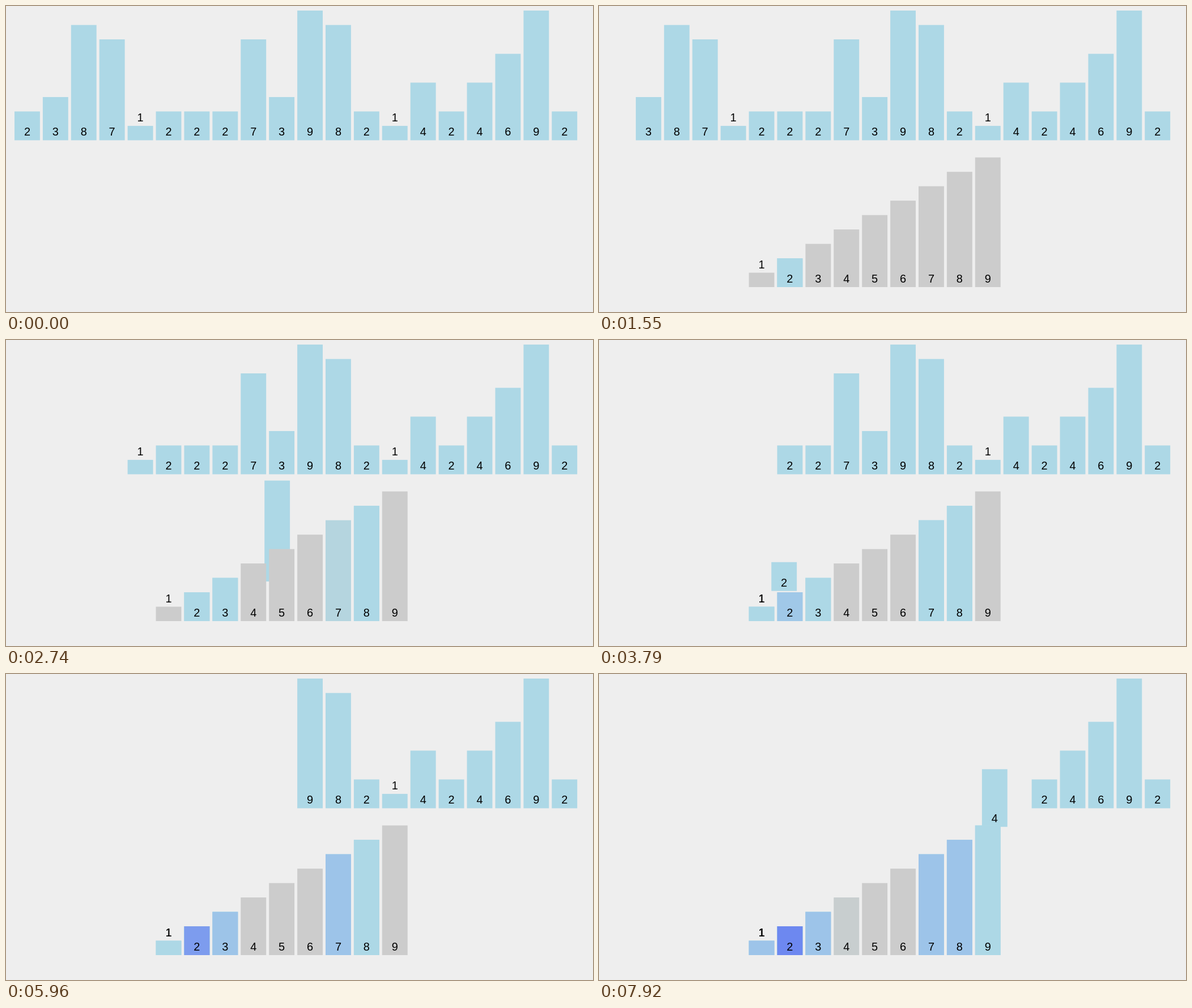
Recreate the animation shown at these times as an HTML page. Size 1036x541 px, loop 7990 ms.

```html
<!DOCTYPE html>
<html lang="en">
<head>
<meta charset="utf-8">
<title>Counting sort</title>
<style>
  html, body { margin: 0; width: 100%; height: 100%; overflow: hidden; background: #eee; }
  svg { display: block; width: 1036px; height: 541px; }
  text { font: 19.96px "Liberation Sans", Arial, sans-serif; text-anchor: middle; fill: #000; }
</style>
</head>
<body>
<svg id="stage" viewBox="0 0 1036 541"></svg>
<script>
const LOOP = 7990, TICK = 70, FIRST_TICK = 500;
const MOVE = 265, GROW_START = 497;
const LEFT = 15, PITCH = 49.91, WIDTH = 44.9, UNIT = 25.48;
const TOP_BASE = 237.4, BUCKET_BASE = 497, TEXT_GAP = 15;
const VALUES = [2, 3, 8, 7, 1, 2, 2, 2, 7, 3, 9, 8, 2, 1, 4, 2, 4, 6, 9, 2];
const GRAY = [204, 204, 204], BLUE = [173, 216, 230];

const stage = document.getElementById("stage");

function add(parent, tag, attrs) {
  const node = document.createElementNS("http://www.w3.org/2000/svg", tag);
  for (const name in attrs) node.setAttribute(name, attrs[name]);
  return parent.appendChild(node);
}

const columnX = column => LEFT + PITCH * column;
const mix = (a, b, p) => a + (b - a) * p;
const mixColor = (a, b, p) => a.map((v, i) => mix(v, b[i], p));
const rgb = color => `rgb(${color.map(Math.round)})`;

function ease(t) {
  t = Math.min(1, Math.max(0, t));
  return t < 0.5 ? 4 * t ** 3 : 1 - 4 * (1 - t) ** 3;
}

// Bars start at their top left corner; short ones carry the label above.
function makeBar(value, column, base) {
  const height = value * UNIT;
  const group = add(stage, "g", {});
  const rect = add(group, "rect", { width: WIDTH, height, fill: rgb(BLUE) });
  const labelY = value === 1 ? -TEXT_GAP : height - TEXT_GAP;
  add(group, "text", { x: WIDTH / 2, y: labelY + 7 }).textContent = value;
  const bar = { value, height, group, rect, x: columnX(column), y: base - height };
  place(bar, bar.x, bar.y);
  return bar;
}

function place(bar, x, y) {
  bar.group.setAttribute("transform", `translate(${x.toFixed(2)} ${y.toFixed(2)})`);
}

// The playback speeds up from the eleventh item on.
const launchTime = i => i < 10 ? 1022 + 520.3 * i : 6407 + 357.3 * (i - 10);

function countColor(count) {
  if (count < 1) return GRAY;
  const extra = count - 1;
  return [BLUE[0] - 16 * extra, BLUE[1] - 20 * extra, BLUE[2] + 2.5 * extra];
}

const items = VALUES.map((value, i) => makeBar(value, i, TOP_BASE));
const buckets = Array.from({ length: 9 }, (_, i) => makeBar(i + 1, i + 5, BUCKET_BASE));

function draw(time) {
  const grown = ease((time - GROW_START) / MOVE);
  const totals = buckets.map(() => 0);

  items.forEach((item, i) => {
    const p = ease((time - launchTime(i)) / MOVE);
    const bucket = buckets[item.value - 1];
    place(item, mix(item.x, bucket.x, p), mix(item.y, bucket.y, p));
    totals[item.value - 1] += p;
  });

  buckets.forEach((bucket, i) => {
    const whole = Math.floor(totals[i]);
    const filled = mixColor(countColor(whole), countColor(whole + 1), totals[i] - whole);
    bucket.group.setAttribute("visibility", time < GROW_START ? "hidden" : "visible");
    bucket.rect.setAttribute("width", WIDTH * grown);
    bucket.rect.setAttribute("height", bucket.height * grown);
    bucket.rect.setAttribute("fill", rgb(mixColor([0, 0, 0], filled, grown)));
  });
}

// Poses are held for one tick each.
function frame() {
  const time = performance.now() % LOOP;
  draw(FIRST_TICK + Math.floor((time - FIRST_TICK + 1) / TICK) * TICK);
  requestAnimationFrame(frame);
}
frame();
</script>
</body>
</html>
```
